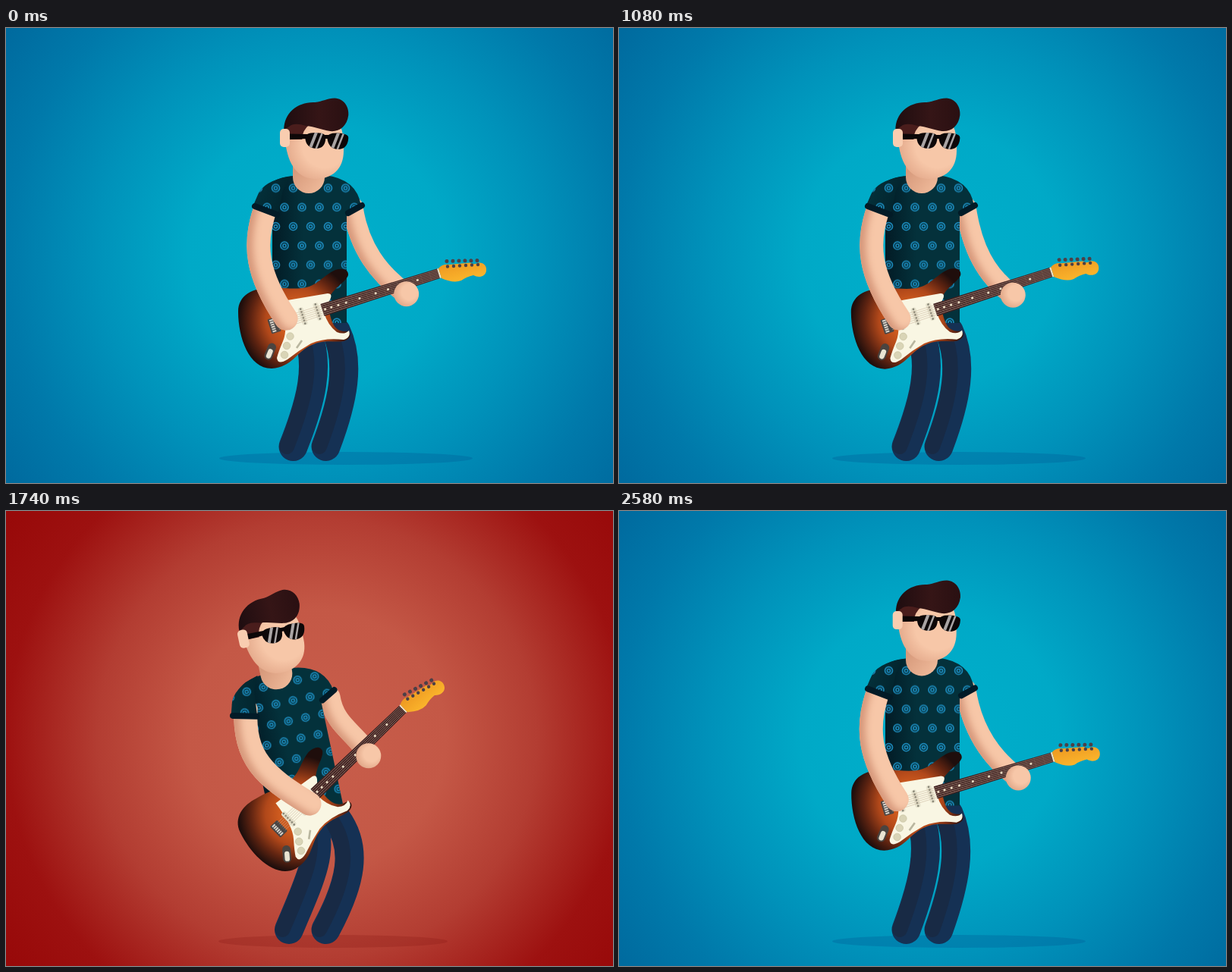
Animation, 800 px wide and 600 px high, one loop 2610 ms. Source, as an HTML page:

```html
<!DOCTYPE html>
<html lang="en">
<head>
<meta charset="utf-8">
<title>Guitar player</title>
<style>
  html, body { margin: 0; width: 100%; height: 100%; overflow: hidden; background: #0069a0; }
  svg { display: block; width: 100vw; height: 100vh; }
  .limb path { fill: none; stroke-linecap: round; }
  .leg path { stroke: #153154; stroke-width: 38; }
  .leg path + path { stroke: #182a45; stroke-width: 20; transform: translate(-8.5px, 0); }
  .arm path { stroke: #f7c7a8; stroke-width: 31; filter: url(#shade); }
  #fretArm path { stroke-width: 27; }
  .cuff { stroke: #021b27; stroke-width: 8; stroke-linecap: round; }
  .cream { fill: #d9d4b6; stroke: #c2bc9c; stroke-width: .6; }
</style>
</head>
<body>
<svg viewBox="0 0 800 600" preserveAspectRatio="none">
  <defs>
    <radialGradient id="blue" gradientUnits="userSpaceOnUse" cx="410" cy="300" r="500">
      <stop offset="0" stop-color="#00b0cb"/><stop offset=".34" stop-color="#00a9c7"/>
      <stop offset=".58" stop-color="#0092ba"/><stop offset=".82" stop-color="#0079aa"/>
      <stop offset="1" stop-color="#006b9f"/>
    </radialGradient>
    <radialGradient id="red" gradientUnits="userSpaceOnUse" cx="410" cy="300" r="500">
      <stop offset="0" stop-color="#c85e4b"/><stop offset=".34" stop-color="#c45846"/>
      <stop offset=".58" stop-color="#b33d32"/><stop offset=".82" stop-color="#9d1110"/>
      <stop offset="1" stop-color="#980909"/>
    </radialGradient>
    <linearGradient id="cloth" gradientUnits="userSpaceOnUse" x1="351" y1="0" x2="392" y2="0">
      <stop offset="0" stop-color="#021b25"/><stop offset="1" stop-color="#04313b"/>
    </linearGradient>
    <linearGradient id="sleeveCloth" gradientUnits="userSpaceOnUse" x1="328" y1="215" x2="362" y2="228">
      <stop offset="0" stop-color="#04313b"/><stop offset="1" stop-color="#03262f"/>
    </linearGradient>
    <radialGradient id="face" gradientUnits="userSpaceOnUse" cx="420" cy="155" r="58">
      <stop offset=".5" stop-color="#f7c7a8"/><stop offset="1" stop-color="#dfa284"/>
    </radialGradient>
    <linearGradient id="neckSkin" gradientUnits="userSpaceOnUse" x1="380" y1="190" x2="414" y2="218">
      <stop offset="0" stop-color="#d79a7c"/><stop offset="1" stop-color="#f0bb9b"/>
    </linearGradient>
    <radialGradient id="hand" cx=".62" cy=".42" r=".62">
      <stop offset=".5" stop-color="#f7c7a8"/><stop offset="1" stop-color="#e2a98a"/>
    </radialGradient>
    <linearGradient id="hair" gradientUnits="userSpaceOnUse" x1="368" y1="0" x2="450" y2="0">
      <stop offset="0" stop-color="#1f0d10"/><stop offset=".55" stop-color="#351516"/>
      <stop offset="1" stop-color="#2a1012"/>
    </linearGradient>
    <radialGradient id="burst" gradientUnits="userSpaceOnUse" cx="384" cy="385" r="80">
      <stop offset=".3" stop-color="#cd5a1e"/><stop offset=".52" stop-color="#b1481a"/>
      <stop offset=".76" stop-color="#602411"/><stop offset=".96" stop-color="#1f0e0c"/>
    </radialGradient>
    <linearGradient id="maple" gradientUnits="userSpaceOnUse" x1="590" y1="310" x2="596" y2="335">
      <stop offset="0" stop-color="#ee9a22"/><stop offset="1" stop-color="#fbb52c"/>
    </linearGradient>
    <pattern id="dots" patternUnits="userSpaceOnUse" x="367" y="198.5" width="23" height="50.6">
      <g id="dotPair" fill="none" stroke="#1a86b6" stroke-width="1.7"></g>
    </pattern>
    <!-- Soft inner shade along the left side -->
    <filter id="shade" filterUnits="userSpaceOnUse" x="200" y="60" width="500" height="540" color-interpolation-filters="sRGB">
      <feOffset in="SourceAlpha" dx="8" dy="-1"/>
      <feGaussianBlur stdDeviation="5" result="lit"/>
      <feFlood flood-color="#d6977a"/>
      <feComposite in2="SourceAlpha" operator="in"/>
      <feComposite in2="lit" operator="out" result="dark"/>
      <feMerge><feMergeNode in="SourceGraphic"/><feMergeNode in="dark"/></feMerge>
    </filter>
    <path id="shirt" d="M378 195Q346 198 340 218L351 246V389H449V246L468 235Q463 199 420 194L399 208Z"/>
    <path id="sleeveShape" d="M376 195.500Q338 201 331 222L325 236L358 247L365 214Z"/>
    <path id="lensShape" d="M395 145Q395 138 408 138Q422 138 422 144Q422 159 409 159Q396 158 395 145ZM424 144Q425 138 438 138.500Q452 139 452 145Q451 160 438 160Q425 159 424 144Z"/>
    <clipPath id="lenses"><use href="#lensShape"/></clipPath>
  </defs>

  <rect id="bg" width="800" height="600"/>
  <ellipse id="shadow" cy="567.5" ry="8.5"/>

  <g class="limb leg" id="legL"><path/><path/></g>
  <g class="limb leg" id="legR"><path/><path/></g>
  <g class="limb arm" id="fretArm"><path/></g>

  <g class="torso">
    <use href="#shirt" fill="url(#cloth)"/>
    <use href="#shirt" fill="url(#dots)"/>
    <path class="cuff" d="M451 244L469 234"/>
    <path d="M378 180H420V197A21 21 0 0 1 378 197Z" fill="url(#neckSkin)"/>
  </g>

  <g id="guitar">
    <path fill="url(#burst)" d="M345 343C326 343 306 352 306 374C306 408 320 449 350 449C378 447 382 427 403 418C420 410 432 415 445 413C456 410 456 401 449 400C434 401 430 390 427 378L426 356C432 342 448 335 451 326C452 318 443 316 434 319C418 326 410 341 390 343C375 345 360 341 345 343Z"/>
    <path fill="#f9f6e3" d="M365 360L424 350Q430 350 428 356L419 375Q424 392 436 401Q446 405 452 399Q455 408 445 411Q420 408 402 416Q386 425 371 437Q358 445 357 435Q359 427 365 413Q372 397 365 360Z"/>
    <g class="cream">
      <circle cx="374.500" cy="406.500" r="4.800"/><circle cx="370" cy="419" r="4.800"/><circle cx="367" cy="431" r="4.800"/>
    </g>
    <path d="M383 422L390 412" stroke="#b9b69f" stroke-width="2.600"/>
    <g transform="translate(348 427) rotate(22)">
      <rect x="-5.500" y="-12" width="11" height="23" rx="5.500" fill="#4a4440"/>
      <rect x="-3" y="-4" width="6.500" height="13" rx="3.200" fill="#e9e4d2"/>
    </g>
    <g transform="translate(417 372) rotate(-17.5)">
      <rect x="-73" y="-10" width="13" height="20" rx="1.500" fill="#4a4645"/>
      <path d="M0 -8.500L162 -6.500V6.500L0 8.500Z" fill="#3f2020"/>
      <g id="fittings"></g>
      <rect x="160.500" y="-6.500" width="2" height="13" fill="#f1e6cc"/>
    </g>
    <path fill="url(#maple)" d="M570 317Q575 311 584 312L612 309.500Q617 313 621 310C628 308 634 313 633 320C632 328 623 330 616 326Q607 328 600 333Q590 337 574 330Z"/>
    <g id="pegs" fill="#4c4047"></g>
  </g>

  <circle id="fretHand" r="16.5" fill="url(#hand)"/>
  <g class="limb arm" id="strumArm"><path/></g>

  <g class="torso">
    <g id="sleeve">
      <use href="#sleeveShape" fill="url(#sleeveCloth)"/>
      <use href="#sleeveShape" fill="url(#dots)"/>
      <path class="cuff" d="M328 235L357 246"/>
    </g>
    <g id="head">
      <path fill="url(#face)" d="M368 128H440Q446 140 445 162C445 186 430 199 408 199C388 199 374 185 369 157Z"/>
      <g id="front">
        <path fill="#4a1d1c" d="M369 126H402Q390 136 391 147H369Z"/>
        <path fill="url(#hair)" d="M367 134C367 112 385 97 408 98C418 97 424 92.500 434 92.500C446 93 453 104 452 115C450 130 440 137 428 136C416 134 408 130 396 129Q380 124 374 130Z"/>
        <path fill="#0d0708" d="M373 139.500L398 140V146L373 147ZM419 141H428V146H419Z"/>
        <use href="#lensShape" fill="#0d0708"/>
        <g clip-path="url(#lenses)" stroke="#a9a4a4" fill="none">
          <path stroke-width="4" d="M401 160L410 137M430 161L439 138"/>
          <path stroke-width="2.500" d="M409 160L418 137M437 161L446 138"/>
        </g>
      </g>
      <rect x="361" y="133" width="13" height="24" rx="5" fill="#f9cdb0"/>
    </g>
  </g>
</svg>

<script>
const LOOP = 2610, BEAT = 480, TURN = 1320, RED_ON = 1380, RED_OFF = 2400;
const $ = id => document.getElementById(id);
const lerp = (a, b, k) => a + (b - a) * k;
const clamp = k => Math.min(1, Math.max(0, k));
const ease = k => .5 - Math.cos(Math.PI * clamp(k)) / 2;
const bump = (t, mid, half) => ease(1 - Math.abs(t - mid) / half);
const rotate = (x, y, deg) => {
  const a = deg * Math.PI / 180, c = Math.cos(a), s = Math.sin(a);
  return [x * c - y * s, x * s + y * c];
};

// Limb curves: start, two controls, end
const limbs = {
  legL: {
    up: [394, 402, 406, 442, 396, 488, 378.5, 552],
    low: [398, 405, 413, 445, 403, 490, 378.5, 552],
    lean: [404, 412, 420, 448, 399, 490, 373, 552]
  },
  legR: {
    up: [433, 396, 446, 437, 438, 487, 421.5, 552],
    low: [435, 400, 454, 440, 445, 490, 421.5, 552],
    lean: [436, 406, 464, 445, 455, 490, 421.5, 552]
  },
  strumArm: {
    up: [341, 235, 322, 285, 326, 320, 354, 369],
    low: [342, 238, 325, 285, 330, 325, 369, 383],
    lean: [316, 262, 313, 325, 340, 350, 400, 386]
  }
};

// Distance of the fretting hand from the body, by time
const slides = [[0, 112], [360, 102], [840, 92], [1320, 115], [1440, 107], [2100, 57], [2580, 110], [2610, 112]];

function slideAt(t) {
  const i = slides.findIndex(k => k[0] > t);
  const [t0, a] = slides[i - 1], [t1, b] = slides[i];
  return lerp(a, b, ease((t - t0) / (t1 - t0)));
}

function setLimb(id, p) {
  const d = `M${p[0]} ${p[1]}C${p.slice(2).join(' ')}`;
  for (const path of $(id).children) path.setAttribute('d', d);
}

function build() {
  const ring = (x, y) => `<circle cx="${x}" cy="${y}" r="5"/><circle cx="${x}" cy="${y}" r="2.1"/>`;
  $('dotPair').innerHTML = ring(11.5, 12.6) + ring(0, 37.9) + ring(23, 37.9);

  let out = '';
  const fret = n => 162 - 228 * (1 - 2 ** (-n / 12));
  for (let n = 1; n <= 21; n++) out += `<path d="M${fret(n)} -7V7" stroke="#8a6a5c" stroke-width=".5" opacity=".4"/>`;
  for (const n of [3, 5, 7, 9, 12, 15, 17, 19, 21])
    out += `<circle cx="${(fret(n) + fret(n - 1)) / 2}" r="1.6" fill="#eadcc4"/>`;
  for (const x of [-48, -27, -6.5]) {
    out += `<rect x="${x - 3.5}" y="-12" width="7" height="24" rx="2.5" fill="#e6e2cd"/>`;
    for (let i = 0; i < 6; i++) out += `<circle cx="${x}" cy="${i * 4 - 10}" r="1.4" fill="#8b8878"/>`;
  }
  for (let i = 0; i < 6; i++) {
    const y = i * 2 - 5;
    out += `<rect x="-71" y="${i * 3 - 8.6}" width="5" height="2" fill="#d8d4cc"/>`;
    out += `<path d="M-62 ${y * 1.4}L162 ${y}" stroke="#c9b49c" stroke-width=".65" opacity=".75"/>`;
  }
  $('fittings').innerHTML = out;

  out = '';
  for (let i = 0; i < 6; i++) {
    const x = 581 + 8 * i;
    out += `<circle cx="${x}" cy="${307.5 - .2 * i}" r="2.5"/><circle cx="${x + 1}" cy="${314.5 - .5 * i}" r="2.2"/>`;
  }
  $('pegs').innerHTML = out;
}

function draw(t) {
  const red = t >= RED_ON && t < RED_OFF;
  const beat = t < TURN ? t / BEAT : 2.75 + 2.25 * (t - TURN) / (LOOP - TURN);
  const dip = .5 + .707 * Math.cos(2 * Math.PI * (beat - .125));
  const rise = 1 - dip;
  // The upper body leads, the legs and hands settle after it
  const lean = t < 1900 ? ease((t - TURN) / 240) : 1 - ease((t - 2170) / 400);
  const settle = lean * lean;

  $('bg').setAttribute('fill', red ? 'url(#red)' : 'url(#blue)');
  const shadow = $('shadow');
  shadow.setAttribute('cx', 448 - 17 * lean * settle);
  shadow.setAttribute('rx', 167 - 16 * lean * settle);
  shadow.setAttribute('fill', red ? 'rgba(130,20,18,.25)' : 'rgba(0,92,150,.33)');

  for (const id in limbs) {
    const { up, low, lean: bent } = limbs[id];
    setLimb(id, up.map((v, i) => {
      const k = id === 'strumArm' && i < 4 ? lean : settle;
      return lerp(lerp(v, low[i], dip), bent[i], k);
    }));
  }

  // Swings over a small arc on the way into the lean
  const drop = 18 * settle - 12 * lean - 3.2 * rise;
  const torso = `translate(${-4 * lean} ${drop}) rotate(${-12 * lean} 448 388)`;
  for (const g of document.querySelectorAll('.torso')) g.setAttribute('transform', torso);
  $('sleeve').setAttribute('transform', `rotate(${-7 * lean} 366 210)`);

  const turn = Math.max(bump(t, 40, 110), bump(t, LOOP + 40, 110), bump(t, TURN, 110));
  $('head').setAttribute('transform', `translate(${-1.6 * rise} ${-1.8 * rise})`);
  $('front').setAttribute('transform', `translate(${-2.6 * (1 - turn)} 0)`);

  const tilt = 3.3 * rise * (1 - lean) - 1.8 * bump(t, 840, 400) - 26.5 * lean ** 1.7;
  const lift = -3 * rise * (1 - lean);
  $('guitar').setAttribute('transform', `translate(0 ${lift}) rotate(${tilt} 414 393)`);

  // The hand rides along the neck
  const [nx, ny] = rotate(slideAt(t), 13, -17.5);
  const [rx, ry] = rotate(nx + 3, ny - 21, tilt);
  const hx = 414 + rx, hy = 393 + ry + lift;
  $('fretHand').setAttribute('cx', hx);
  $('fretHand').setAttribute('cy', hy);
  const top = -3 * rise;
  setLimb('fretArm', [
    lerp(457, 427, lean), lerp(236 + top, 245, lean),
    lerp(465, 433, lean), lerp(290 + top, 285, lean),
    hx - lerp(36, 14, lean), hy - lerp(26, 30, lean), hx, hy
  ]);
}

build();
draw(0);
const start = performance.now();
requestAnimationFrame(function tick(now) {
  draw(Math.max(0, now - start) % LOOP);
  requestAnimationFrame(tick);
});
</script>
</body>
</html>
```
